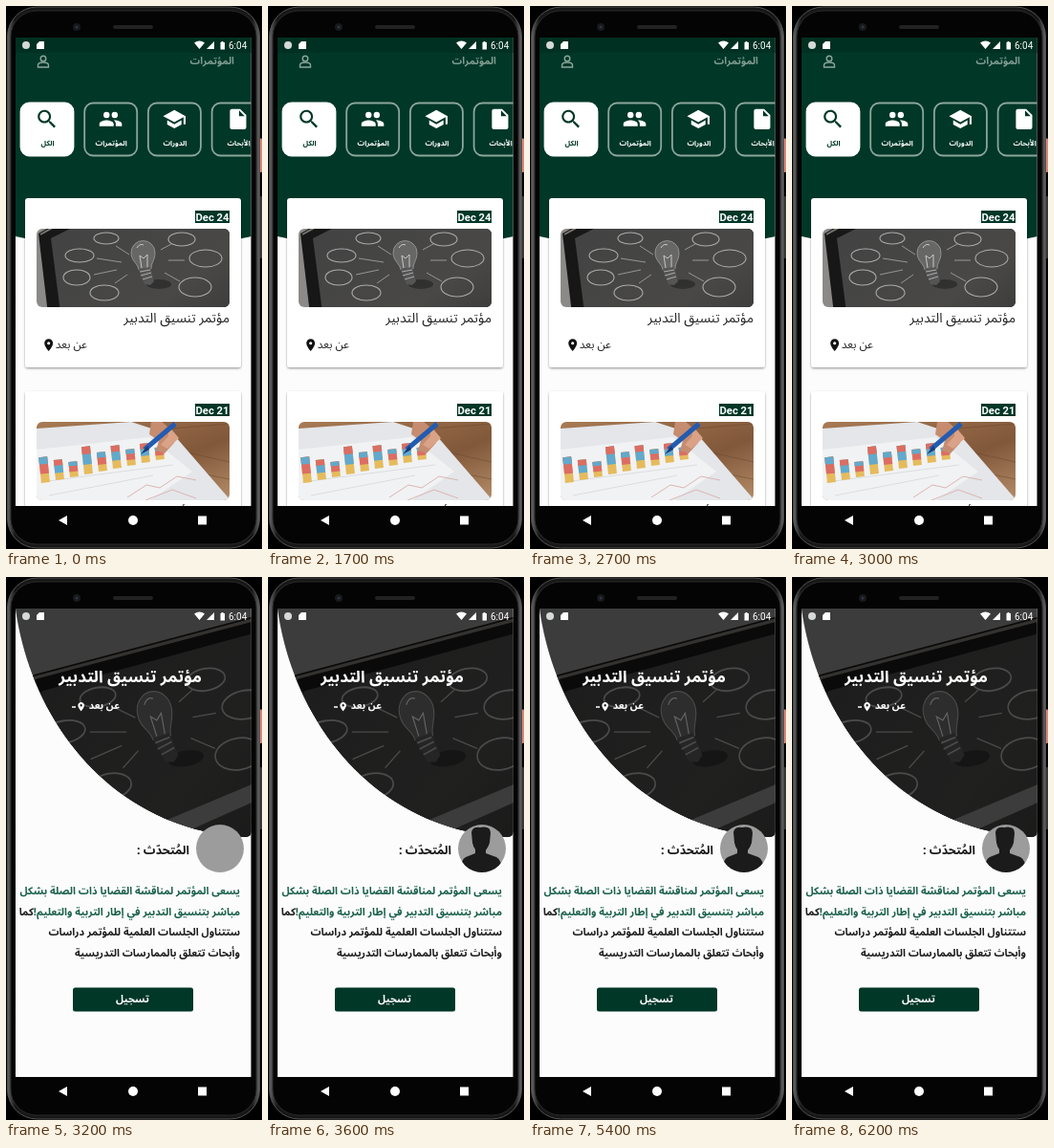
Write an HTML page that moves like this. It is 268 by 568 pixels and loops after 6.4 s.

```html
<!DOCTYPE html>
<html lang="ar">
<head>
<meta charset="utf-8">
<style>
html, body { margin: 0; width: 100%; height: 100%; overflow: hidden; background: #000; }
svg { display: block; }
text { font-family: "Noto Sans Arabic", "DejaVu Sans", sans-serif; }
.ar { direction: rtl; }
.en { font-family: Roboto, sans-serif; }
.b { font-weight: bold; }
</style>
</head>
<body>
<svg width="268" height="568" viewBox="0 0 268 568">
<defs>
  <linearGradient id="slate" x1="0" y1="0" x2="1" y2="1">
    <stop offset="0" stop-color="#424242"/><stop offset=".5" stop-color="#494847"/><stop offset="1" stop-color="#292929"/>
  </linearGradient>
  <linearGradient id="wood" x1="0" y1="0" x2="1" y2="1">
    <stop offset="0" stop-color="#a87b55"/><stop offset=".6" stop-color="#81583a"/><stop offset="1" stop-color="#b48d68"/>
  </linearGradient>
  <linearGradient id="rim" x1="0" x2="1">
    <stop offset="0" stop-color="#666"/><stop offset=".03" stop-color="#171717"/><stop offset=".97" stop-color="#171717"/><stop offset="1" stop-color="#666"/>
  </linearGradient>
  <filter id="shade" x="-10%" y="-10%" width="120%" height="120%">
    <feDropShadow dx="0" dy="1.2" stdDeviation="1.3" flood-opacity=".4"/>
  </filter>
  <clipPath id="screen"><rect x="10" y="33" width="246.500" height="490"/></clipPath>
  <clipPath id="pic1"><rect x="32" y="233" width="202" height="82" rx="6"/></clipPath>
  <clipPath id="pic2"><rect x="32" y="435" width="202" height="82" rx="6"/></clipPath>
  <clipPath id="hero"><path d="M10 33C26 151 111 264 250 272Q257 272 257 265V33Z"/></clipPath>
  <clipPath id="face"><circle cx="224" cy="284" r="25"/></clipPath>
  <path id="pin" d="M12 2C8.1 2 5 5.1 5 9c0 5.2 7 13 7 13s7-7.800 7-13c0-3.900-3.100-7-7-7zm0 9.500a2.500 2.500 0 1 1 0-5 2.500 2.500 0 0 1 0 5z"/>

  <g id="board">
    <rect x="0" y="130" width="300" height="260" fill="#8b8a88"/>
    <path d="M34 238L62 222 290 205V390H52Z" fill="#171717"/>
    <path d="M36 239L63 224 290 207" fill="none" stroke="#77736d" stroke-width="2"/>
    <path d="M47 243L67 233 290 215V390H66Z" fill="url(#slate)"/>
    <g fill="none" stroke="#aaa" stroke-width="1.1">
      <ellipse cx="105" cy="243" rx="13" ry="6"/>
      <ellipse cx="77" cy="261" rx="15" ry="7"/>
      <ellipse cx="74" cy="284" rx="14" ry="8"/>
      <ellipse cx="103" cy="300" rx="15" ry="8"/>
      <ellipse cx="184" cy="244" rx="14" ry="7"/>
      <ellipse cx="209" cy="264" rx="17" ry="9"/>
      <ellipse cx="198" cy="294" rx="17" ry="10"/>
      <path d="M115 251l14 9M95 264l26 4M92 281l24-5M114 290l13-9M162 255l11-6M170 266h17M166 279l16 9" stroke-width=".8"/>
    </g>
    <ellipse cx="160" cy="291" rx="13" ry="5" fill="#222" opacity=".6"/>
    <path d="M139 276C138 269 131 267 131 258a12.500 12.500 0 0 1 25 0c0 8-4 10-4 17Z" fill="#c5c5c5" fill-opacity=".25" stroke="#aaa" stroke-width=".7"/>
    <path d="M137 253q3-5 7-3M142 274l-2-13 4 3 4-4 0 14" fill="none" stroke="#e0e0e0" stroke-width=".8"/>
    <path d="M139 275l12-2 4 15-4 4-6-1Z" fill="#555"/>
    <path d="M140 278l11-2m-10 6l11-3m-9 7l10-3" stroke="#ababab"/>
  </g>
</defs>

<rect width="268" height="568"/>
<rect x="265" y="138.500" width="3" height="35.500" rx="1" fill="#d98476"/>
<rect x="265" y="199" width="3" height="65" rx="1" fill="#363636"/>
<rect x="1.500" y="1" width="264" height="566" rx="31" fill="url(#rim)" stroke="#505050"/>
<rect x="5" y="5" width="257" height="558" rx="27" fill="#040404" stroke="#292929"/>
<rect x="112" y="20" width="42" height="4" rx="2" fill="#222"/>
<circle cx="74" cy="22" r="4" fill="#18191e"/><circle cx="74" cy="22" r="1.500" fill="#30343d"/>

<g clip-path="url(#screen)">
  <rect x="10" y="33" width="247" height="490" fill="#fcfcfc"/>
  <g id="list">
    <path d="M10 33H257V241Q133 270 10 241Z" fill="#003727"/>
    <rect x="10" y="33" width="247" height="16" fill="#003021"/>
    <text class="ar b" x="239" y="61" font-size="10.500" fill="#819d92">المؤتمرات</text>
    <g fill="none" stroke="#8ba69b" stroke-width="1.400">
      <circle cx="39" cy="55" r="2.800"/><path d="M33.500 64v-2q0-3 5.500-3t5.500 3v2Z"/>
    </g>
    <g id="tiles"></g>
    <g id="cards"></g>
    <use href="#board" clip-path="url(#pic1)"/>
    <text class="ar" x="234" y="331" font-size="14" fill="#222">مؤتمر تنسيق التدبير</text>
    <use href="#pin" transform="translate(37 347) scale(.64)" fill="#111"/>
    <text class="ar" x="85" y="358" font-size="11.800" fill="#222">عن بعد</text>
    <g clip-path="url(#pic2)">
      <rect x="32" y="435" width="202" height="82" fill="url(#wood)"/>
      <path d="M160 443l74-6M172 463l62 14M190 486l44 9" stroke="#6b482e" opacity=".5"/>
      <path d="M32 442L131 435 177 450 235 517H32Z" fill="#e4e6e9"/>
      <path d="M32 464L150 451 195 487 151 517H32Z" fill="#f1f2f3"/>
      <path d="M36 498l139-18M45 512l109-21" stroke="#d0d4d9" stroke-width=".7"/>
      <g id="bars"></g>
      <path d="M127 514l20-13 14 3 18-12 20 4M146 517l28-11 25 9" fill="none" stroke="#dbb5b4"/>
      <path d="M163 435Q179 447 176 457L166 468 157 465 160 455 150 448 152 435Z" fill="#c58c70"/>
      <path d="M170 439l11 13-12 11-7-4 8-9Z" fill="#daa286"/>
      <path d="M177 437L145 464" stroke="#235bb0" stroke-width="5"/>
      <path d="M148 460l-7 9 9-5Z" fill="#163c7b"/>
    </g>
    <text class="ar" x="234" y="533" font-size="14" fill="#222">ملتقى الأبحاث والدراسات</text>
  </g>

  <g id="detail">
    <g clip-path="url(#hero)">
      <use href="#board" transform="translate(155 142) rotate(-10) scale(1.450 1.650) translate(-143 -259)"/>
      <path d="M145 264L257 217V236L185 268Z" fill="#8a8a88"/>
      <rect x="10" y="33" width="247" height="240" opacity=".56"/>
    </g>
    <text class="ar b" x="205" y="110" font-size="17" fill="#fff">مؤتمر تنسيق التدبير</text>
    <text class="ar b" x="119" y="138" font-size="10.500" fill="#fff">عن بعد</text>
    <use href="#pin" transform="translate(73 130) scale(.47)" fill="#fff"/>
    <path d="M69 136h4" stroke="#fff" stroke-width="1.300"/>
    <circle cx="224" cy="284" r="25" fill="#9c9c9c"/>
    <g id="avatar" clip-path="url(#face)" fill="#1b1b1b">
      <path d="M213 267q1-6 9-5 11-2 11 6l-1 10q-3 10-9 10-7 0-9-10Z"/>
      <path d="M217 283h11v6l11 4q5 2 7 16h-45q1-14 6-16l10-4Z"/>
    </g>
    <text class="ar b" x="192" y="290" font-size="12.500" fill="#181818">المُتحدّث :</text>
    <g class="b" font-size="10.900" fill="#1c1c1c">
      <text class="ar" x="245" y="332" fill="#1a604b">يسعى المؤتمر لمناقشة القضايا ذات الصلة بشكل</text>
      <text class="ar" x="245" y="354"><tspan fill="#1a604b">مباشر بتنسيق التدبير في إطار التربية والتعليم!</tspan>كما</text>
      <text class="ar" x="245" y="375">ستتناول الجلسات العلمية للمؤتمر دراسات</text>
      <text class="ar" x="245" y="397">وأبحاث تتعلق بالممارسات التدريسية</text>
    </g>
    <rect x="70" y="429.500" width="126" height="25" rx="2.500" fill="#003727"/>
    <text class="ar b" x="132.500" y="445" font-size="10.800" fill="#fff" text-anchor="middle">تسجيل</text>
  </g>

  <g fill="#fff">
    <circle cx="21" cy="41" r="4" fill="#d5d9d7"/>
    <path d="M35 37h5v8h-8v-5Z"/>
    <path d="M197 38.500q5.500-4 11 0L202.500 45ZM218 37v8h-8ZM224.500 38h1v-1h2v1h1.500v7.500h-4.500Z"/>
    <text class="en" x="233" y="45" font-size="10">6:04</text>
  </g>
</g>
<g fill="#fff">
  <path d="M55 538l9-5v10Z"/><circle cx="133" cy="538" r="5"/><rect x="201" y="533.500" width="9" height="9"/>
</g>
</svg>
<script>
const $ = id => document.getElementById(id);
const icons = [
  ["الكل", "M15.5 14h-.8l-.3-.3A6.500 6.500 0 1 0 13.700 14.400l.3.3v.8l5 5 1.500-1.500zm-6 0A4.500 4.500 0 1 1 14 9.500 4.500 4.500 0 0 1 9.500 14z"],
  ["المؤتمرات", "M16 11a3 3 0 1 0 0-6 3 3 0 0 0 0 6zM8 11a3 3 0 1 0 0-6 3 3 0 0 0 0 6zm0 2c-2.300 0-7 1.200-7 3.500V19h14v-2.500c0-2.300-4.700-3.500-7-3.500zm8 0l-1 .05c1.200.8 2 2 2 3.450V19h6v-2.500c0-2.300-4.700-3.500-7-3.500z"],
  ["الدورات", "M5 13.200v4L12 21l7-3.800v-4L12 17zM12 3L1 9l11 6 9-4.900V17h2V9z"],
  ["الأبحاث", "M6 2q-2 0-2 2v16q0 2 2 2h12q2 0 2-2V8l-6-6zm7 7V3.500L18.500 9z"]
];
$("tiles").innerHTML = icons.map(([label, path], i) => {
  const x = 15 + i * 66.700, ink = i ? "#fff" : "#003727";
  return `<rect x="${x + .5}" y="101.500" width="55" height="55" rx="9" fill="${i ? "none" : "#fff"}" stroke="${i ? "#8ca59a" : "#fff"}" stroke-width="1.800"/>
    <path transform="translate(${x + 15} 105.500) scale(1.070)" d="${path}" fill="${ink}"/>
    <text class="ar b" x="${x + 28.500}" y="146" font-size="7.500" text-anchor="middle" fill="${ink}">${label}</text>`;
}).join("");

$("cards").innerHTML = [["Dec 24", 201], ["Dec 21", 403]].map(([date, y]) =>
  `<rect x="20" y="${y}" width="226" height="177" rx="3" fill="#fff" filter="url(#shade)"/>
   <rect x="198" y="${y + 13}" width="36" height="13" fill="#003727"/>
   <text class="en b" x="216" y="${y + 23.500}" font-size="11.300" text-anchor="middle" fill="#fff">${date}</text>`).join("");

const heights = [27, 21, 16, 29, 20, 24, 17, 20, 13];
$("bars").innerHTML = heights.map((h, i) => {
  const x = 37 + i * 15, y = 499 - i * 3;
  return `<g transform="translate(${x} ${y}) rotate(-6)">
    <path d="M0 ${-h}h9v${h}h-9z" fill="#e5bb5d"/>
    <path d="M0 ${-h}h9v${h * .65}h-9z" fill="${i % 2 ? "#62a9cb" : "#dc6d62"}"/>
    <path d="M0 ${-h}h9v${h * .28}h-9z" fill="${i % 2 ? "#dc6d62" : "#62a9cb"}"/></g>`;
}).join("");

const show = (id, on) => $(id).style.display = on ? "" : "none";
function draw(now) {
  const t = now % 6400;
  show("list", t < 3200);
  show("detail", t >= 3200);
  show("avatar", t >= 3400);
  requestAnimationFrame(draw);
}
draw(performance.now());
</script>
</body>
</html>
```
